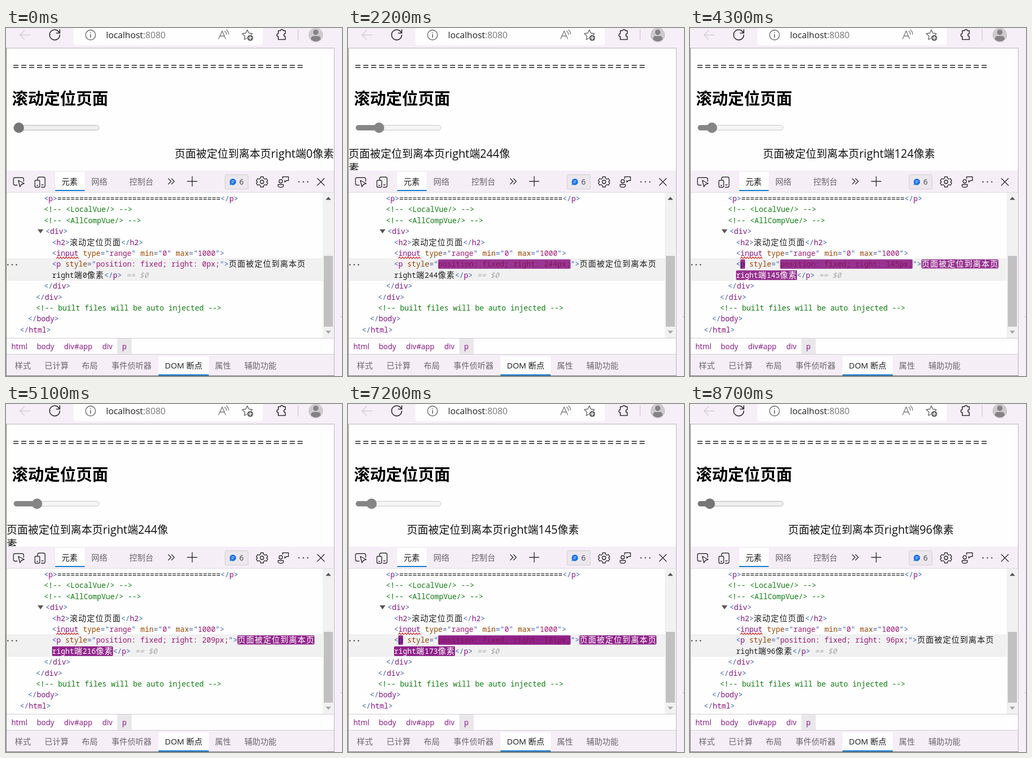
Animation, 628 px wide and 649 px high, one loop 8.8 s. Source, as an HTML page:

```html
<!DOCTYPE html>
<html lang="zh-CN">
<head>
<meta charset="utf-8">
<style>
html, body { margin: 0; width: 100%; height: 100%; overflow: hidden; background: #f6eff7; }
svg { position: absolute; left: 0; top: 0; }
text { font-family: "Open Sans", "Noto Sans CJK SC", "Noto Sans CJK", sans-serif; white-space: pre; }
.cn { font-size: 15px; fill: #6b676d; }
.on { fill: #1b1b1b; }
.crumb { font-size: 14px; fill: #881280; }
.icon { fill: none; stroke: #2b2b2b; stroke-width: 1.4; stroke-linecap: round; stroke-linejoin: round; }
.code text { font-family: "Noto Sans Mono", "Noto Sans CJK SC", "Noto Sans CJK", monospace; font-size: 13.75px; fill: #202020; }
.code .b { fill: #3a62b5; }
.code .t { fill: #881280; }
.code .a { fill: #994500; }
.code .v { fill: #a01a72; }
.code .c { fill: #107c10; }
.code .g { fill: #aaa; font-style: italic; }
.code .w { font-size: 15px; letter-spacing: 1px; }
.code .hotValue { fill: #86145a; }
.code .hotTag { fill: #42157a; }
.code .hotText { fill: #fff; }
.flash { fill: #881280; }
#view { position: absolute; left: 1px; top: 38px; width: 612px; height: 227px; overflow: hidden; }
#note { position: absolute; top: 183px; margin: 0; color: #111;
  font: 20px/26.5px "Noto Sans CJK SC", "Noto Sans CJK", sans-serif; }
#note span { font: 21px/0 "Open Sans", sans-serif; }
</style>
</head>
<body>
<svg width="628" height="649" viewBox="0 0 628 649">
  <!-- browser bar -->
  <path d="M126 0H480V27q0 5-5 5H131q-5 0-5-5z" fill="#fefefe"/>
  <g class="icon">
    <path d="M45 13H26M34.500 4.500L26 13l8.500 8.500" stroke="#d0cad2"/>
    <path d="M99.500 8.500A9.500 9.500 0 1 0 100.500 13M100.500 3v6.500h-6.500" stroke-width="1.700"/>
    <g stroke="#666"><circle cx="158" cy="13" r="9.300"/><path d="M158 12v5.500M158 8.500v.2" stroke-width="1.700"/></g>
    <path d="M397.500 20L404 5.500l6.500 14.500M400 15h8M409 6q3 2 3 6M412 3.500q4 3 4 8" stroke="#777"/>
    <path d="M450 19l-4.500 2.500 1-6.500-5-4.500 6.500-1 3-6 3 6 6.500 1-2 2" stroke="#666"/>
    <circle cx="456.500" cy="18.500" r="5.500" fill="#666" stroke="none"/>
    <path d="M456.500 15.500v6M453.500 18.500h6" stroke="#fff"/>
    <path d="M509 5h4a2.800 2.800 0 0 1 5.500 0h3.500v5.500a2.600 2.600 0 0 0 0 5.200v5.800h-13v-5.500a2.700 2.700 0 0 1 0-5.500z" stroke-width="1.600"/>
    <path d="M546 3v20" stroke="#d2ccd4"/>
  </g>
  <text x="187" y="19" font-size="16.500" fill="#222">localhost<tspan fill="#757575">:8080</tspan></text>
  <circle cx="579" cy="13" r="13.500" fill="#cdc9cd"/>
  <circle cx="579" cy="8" r="5" fill="#858285"/>
  <path d="M570 21q0-6 5-6h8q5 0 5 6-4 4-9 4t-9-4z" fill="#858285"/>

  <!-- page -->
  <path d="M0 38H613V266H0z" fill="#fefefe"/>
  <text id="rule" x="12.500" y="79" font-size="21" letter-spacing="2.750" fill="#111"></text>
  <text x="11" y="142" font-size="30" font-weight="700" fill="#000">滚动定位页面</text>
  <rect id="track" x="15" y="181.500" width="159" height="9" rx="4.500"/>
  <rect id="fill" x="14.500" y="181" height="10" rx="5"/>
  <circle id="thumb" cy="186" r="9.700"/>

  <!-- tools bar -->
  <path d="M1 266H613V307H1z" fill="#f5eef6"/>
  <path d="M92 268h55v35H92z" fill="#fefefe"/>
  <path d="M92 302h55v2H92z" fill="#0b78d0"/>
  <text class="cn on" x="104" y="292">元素</text>
  <text class="cn" x="159.500" y="292">网络</text>
  <text class="cn" x="230.500" y="292">控制台</text>
  <g class="icon">
    <path d="M21 293h-4q-3 0-3-3v-8q0-3 3-3h13q3 0 3 3v4M23 284l3 12 3-4.500 5-1.500z"/>
    <path d="M59 283v-2q0-3 3-3h8q3 0 3 3v13q0 3-3 3h-4M66.500 292.500h3"/>
    <rect x="54" y="284" width="9" height="13" rx="2"/><path d="M57.500 293.500h2"/>
    <path d="M303.500 281l5 5-5 5M309.500 281l5 5-5 5M348 277v18M339 286h18"/>
    <rect x="409.500" y="273.500" width="43" height="27" rx="2" fill="#ebe7ed" stroke="#d2ced4" stroke-width="1"/>
    <path d="M476 277.500h5l.6 3 2.400 1.300 2.800-1 2.400 4-2.200 2.200 2.200 2.200-2.400 4-2.800-1-2.400 1.300-.6 3h-5l-.6-3-2.400-1.300-2.800 1-2.400-4 2.200-2.200-2.200-2.200 2.400-4 2.800 1 2.400-1.300z"/>
    <circle cx="478.500" cy="287" r="3.200"/>
    <circle cx="513.500" cy="286" r="3.200"/>
    <path d="M508.500 292h10v2q0 3-5 3t-5-3zM517 281v-3.500h11v7h-4l-3 3v-3"/>
    <path d="M547.500 287h.1M555.800 287h.1M564 287h.1" stroke-width="2.300"/>
    <path d="M582 280.500l13 13M595 280.500l-13 13"/>
  </g>
  <path d="M424 281a6 6 0 1 1-3 11.200l-3 .8.800-3A6 6 0 0 1 424 281z" fill="#1a73e8"/>
  <path d="M421.500 285.500h5M421.500 288.500h3.500" stroke="#fff"/>
  <text x="436" y="292" font-size="14.500" fill="#444">6</text>

  <!-- elements tree -->
  <path d="M1 307H613V578H1z" fill="#fefefe"/>
  <path d="M1 306.500H613" stroke="#ded8e0"/>
  <path d="M1 430H592V471H1z" fill="#f1f1f2"/>
  <path d="M1 430.500H592M1 470.500H592" stroke="#e3e3e4" stroke-dasharray="1 1"/>
  <path d="M3.500 441.500h.1M11.500 441.500h.1M19.500 441.500h.1" stroke="#333" stroke-width="2.400" stroke-linecap="round"/>
  <path d="M59 375.500h11l-5.500 7.500z" fill="#555"/>
  <g id="tagFlash" class="flash"><rect x="94" y="431.500" width="9" height="17.500" rx="2"/></g>
  <g id="valueFlash" class="flash"><rect x="168.500" y="431.500" height="17.500" rx="2"/></g>
  <g id="textFlash" class="flash">
    <rect y="431.500" width="144" height="17" rx="2"/>
    <rect x="86" y="452" height="18" rx="2"/>
  </g>
  <g id="code" class="code"></g>
  <path id="squiggle" fill="none" stroke="#dc3b3b" stroke-width="1.200"/>
  <path d="M592 307h20v271h-20z" fill="#f1f1f1"/>
  <path d="M594 425h17v132h-17z" fill="#c1c1c1"/>
  <path d="M597.500 320.500h10l-5-5.500z" fill="#505050"/>
  <path d="M597.500 564.500h10l-5 5.500z" fill="#a3a3a3"/>

  <!-- crumbs and lower tabs -->
  <path d="M1 578H613V609H1z" fill="#fefefe"/>
  <path d="M208 579h27v29h-27z" fill="#e9e7ea"/>
  <path d="M1 578.500H613M1 608.500H613" stroke="#cfcbd1"/>
  <g id="crumbs"></g>
  <path d="M1 609H613V648H1z" fill="#f5eef6"/>
  <path d="M285 612h94v36h-94z" fill="#fefefe"/>
  <path d="M285 646h94v2h-94z" fill="#0b78d0"/>
  <g id="tabs"></g>
  <path d="M0 37.500H613.500V648" fill="none" stroke="#b5b0b7"/>
  <path d="M.5 38V648.500H614" fill="none" stroke="#77727a"/>
  <path d="M626 538.500h2" stroke="#a8a2aa"/>
</svg>
<div id="view"><p id="note">页面被定位到离本页<span>right</span>端<span id="shown">0</span>像素</p></div>

<script>
const $ = id => document.getElementById(id);
const CHAR = 8.25, LOOP = 8800;

const s = (cls, text, id = '') =>
  `<tspan class="${cls}"${id && ` id="${id}"`}>${text.replace(/</g, '&lt;')}</tspan>`;
const open = (name, attrs = '', id) => s('b', '<') + s('t', name, id) + attrs + s('b', '>');
const close = name => s('b', '</') + s('t', name) + s('b', '>');
const attr = (name, value, id) => ' ' + s('a', name) + s('b', '="') + s('v', value, id) + s('b', '"');
const comment = text => s('c', `<!-- ${text} -->`);

const lines = [
  [71, open('p') + '='.repeat(37) + close('p')],
  [71, comment('<LocalVue/>')],
  [71, comment('<AllCompVue/>')],
  [74, open('div')],
  [86, open('h2') + s('w', '滚动定位页面') + close('h2')],
  [86, open('input', attr('type', 'range') + attr('min', '0') + attr('max', '1000'))],
  [86, open('p', attr('style', '', 'value'), 'tag') + s('w', '页面被定位到离本页', 'head')],
  [86, `<tspan id="tail">right${s('w', '端')}<tspan id="count"></tspan>${s('w', '像素')}</tspan>`
    + close('p') + s('g', ' == $0')],
  [71, close('div')],
  [56, close('div')],
  [56, comment('built files will be auto injected')],
  [41, close('body')],
  [26, close('html')]
];
$('code').innerHTML = lines.map(([x, html], i) =>
  `<text x="${x}" y="${323 + 20.4 * i}">${html}</text>`).join('');

const row = (y, cls, items) => items.map(([x, label, extra = '']) =>
  `<text class="${cls} ${extra}" x="${x}" y="${y}">${label}</text>`).join('');
$('crumbs').innerHTML = row(599, 'crumb',
  [[10, 'html'], [57.5, 'body'], [108.5, 'div#app'], [180, 'div'], [217, 'p']]);
$('tabs').innerHTML = row(635, 'cn', [[16.5, '样式'], [72, '已计算'], [141.5, '布局'],
  [197, '事件侦听器'], [297, 'DOM 断点', 'on'], [390.5, '属性'], [445.5, '辅助功能']]);
$('rule').textContent = '='.repeat(37);
$('squiggle').setAttribute('d', 'M94 430' + 'l2.600 -3l2.600 3'.repeat(8));

// Thumb travel in pixels over time
const drag = [[1300, 0], [1500, 6], [2000, 34], [2200, 34], [2700, 52], [3250, 36], [3400, 33],
  [3900, 28], [4400, 14], [4800, 23], [4970, 29], [5000, 30], [5100, 34], [5700, 56], [6000, 64],
  [6100, 66], [6300, 69], [6700, 48], [7070, 25], [7100, 24], [7200, 20], [7500, 12], [7800, 8], [8100, 13]];

function travel(t) {
  const i = drag.findIndex(p => p[0] > t);
  if (i === 0) return 0;
  if (i < 0) return drag[drag.length - 1][1];
  const [t0, a] = drag[i - 1], [t1, b] = drag[i];
  return Math.round(a + (b - a) * (t - t0) / (t1 - t0));
}
const valueOf = k => k > 0 ? Math.floor(4 + 7.08 * k) : 0;

function drawSlider(t, k) {
  const held = t >= 1300 && t < 8100;
  const hover = t >= 700 && t < 1300;
  const dark = held ? '#858585' : hover && t >= 900 ? '#5f5f5f' : '#767676';
  $('track').setAttribute('fill', held ? '#f5f5f5' : hover ? '#e5e5e5' : '#efefef');
  $('track').setAttribute('stroke', held ? '#c6c6c6' : '#b2b2b2');
  $('fill').setAttribute('fill', dark);
  $('fill').setAttribute('width', 9.5 + k);
  $('thumb').setAttribute('fill', dark);
  $('thumb').setAttribute('cx', 24 + k);
}

function drawTree(t) {
  // The tree trails the page slightly
  const value = String(valueOf(travel(t - 130)));
  const count = String(valueOf(travel(t - 100)));
  $('value').textContent = `position: fixed; right: ${value}px;`;
  $('count').textContent = count;

  const n = t / 100 % 11;
  const active = t >= 1400 && t < 8300;
  const alpha = 1 - 0.016 * ((n + 10) % 11);
  const valueOn = active && n !== 7, textOn = active && n !== 0, tagOn = valueOn && textOn;
  const len = 27 + value.length;
  $('valueFlash').firstElementChild.setAttribute('width', len * CHAR);
  const [top, bottom] = $('textFlash').children;
  top.setAttribute('x', 168.5 + (len + 2) * CHAR);
  bottom.setAttribute('width', 48 + (5 + count.length) * CHAR);
  $('valueFlash').setAttribute('opacity', valueOn ? alpha : 0);
  $('textFlash').setAttribute('opacity', textOn ? alpha : 0);
  $('tagFlash').setAttribute('opacity', tagOn ? alpha : 0);
  $('value').classList.toggle('hotValue', valueOn);
  $('tag').classList.toggle('hotTag', tagOn);
  $('head').classList.toggle('hotText', textOn);
  for (const el of [$('tail'), ...$('tail').children]) el.classList.toggle('hotText', textOn);
}

const start = performance.now();
function frame() {
  const t = Math.floor((performance.now() - start) % LOOP / 100) * 100;
  const k = travel(t), v = valueOf(k);
  drawSlider(t, k);
  drawTree(t);
  $('shown').textContent = v;
  $('note').style.right = v * 1.25 + 'px';
  requestAnimationFrame(frame);
}
frame();
</script>
</body>
</html>
```
